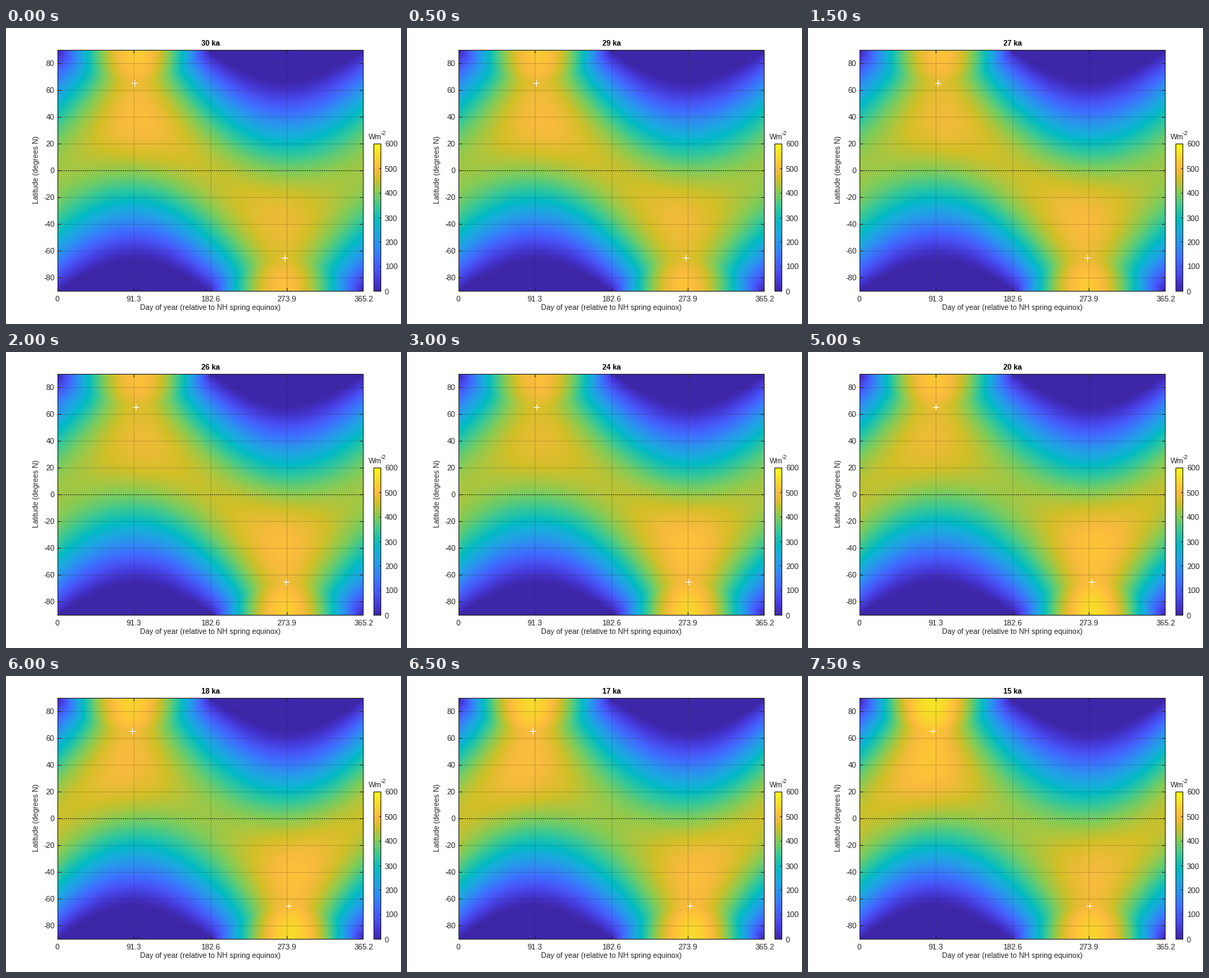
A matplotlib script for the animation above (8000 ms loop, 560 by 420 pixels).

```python
"""Daily insolation by latitude and day of year, 30 ka to 15 ka."""
import numpy as np
import matplotlib.pyplot as plt
from matplotlib.animation import FuncAnimation
from matplotlib.colors import LinearSegmentedColormap

W, H, DPI = 560, 420, 100
PX = 72 / DPI                      # points per pixel
LEFT, RIGHT, TOP, BOTTOM = 73, 507, 31, 374
YEAR = 365.24
SOLAR = 1365
QMAX = 600
START_KA, STEPS = 30, 16
INK = "#262626"

plt.rcParams["font.family"] = "Liberation Sans"

# Blue to yellow; stops are placed in 63rds of the scale
PARULA = LinearSegmentedColormap.from_list("parula", [(s / 63, c) for s, c in (
    (0, (.242, .150, .660)), (4, (.271, .215, .836)), (9, (.281, .323, .958)),
    (14, (.244, .436, .999)), (20, (.169, .570, .936)),
    (26, (.095, .680, .860)), (30, (.007, .731, .766)),
    (36, (.216, .784, .592)), (42, (.504, .799, .348)),
    (48, (.820, .750, .154)), (52, (.973, .730, .239)),
    (54, (.997, .766, .220)), (58, (.968, .864, .164)),
    (63, (.977, .984, .081)))], N=256)


def orbit(ka):
    """Eccentricity, obliquity and solar longitude of perihelion."""
    e = .0204 - .000227 * (ka - 15)
    tilt = 23.25 - 1.01 * np.cos(2 * np.pi * (ka - 29.2) / 40)
    peri = 34.2 - 16.45 * (ka - 15)
    return e, np.radians(tilt), np.radians(peri)


def mean_anomaly(nu, e):
    ea = 2 * np.arctan2(np.sqrt(1 - e) * np.sin(nu / 2),
                        np.sqrt(1 + e) * np.cos(nu / 2))
    return ea - e * np.sin(ea)


def day_at(lon, e, peri):
    """Days from the spring equinox to a solar longitude."""
    m = mean_anomaly(lon - peri, e) - mean_anomaly(-peri, e)
    return m % (2 * np.pi) / (2 * np.pi) * YEAR


def insolation(day, lat, e, tilt, peri):
    m = mean_anomaly(-peri, e) + 2 * np.pi * day / YEAR
    ea = m
    for _ in range(6):
        ea = m + e * np.sin(ea)
    nu = 2 * np.arctan2(np.sqrt(1 + e) * np.sin(ea / 2),
                        np.sqrt(1 - e) * np.cos(ea / 2))
    dec = np.arcsin(np.sin(tilt) * np.sin(nu + peri))
    h = np.arccos(np.clip(-np.tan(lat) * np.tan(dec), -1, 1))
    dist = (1 + e * np.cos(nu)) / (1 - e * e)
    return SOLAR / np.pi * dist ** 2 * (
        h * np.sin(lat) * np.sin(dec) + np.cos(lat) * np.cos(dec) * np.sin(h))


def px(day):
    return LEFT + (RIGHT - LEFT) * day / YEAR


def py(lat):
    return (TOP + BOTTOM) / 2 - (BOTTOM - TOP) * lat / 180


def mid(v):
    """Centre of the pixel that holds v."""
    return np.floor(v) + .5


fig = plt.figure(figsize=(W / DPI, H / DPI), dpi=DPI, facecolor="white")
ax = fig.add_axes([0, 0, 1, 1])
ax.axis("off")


def line(xs, ys, color=INK, **kw):
    return ax.plot(xs, ys, color=color, lw=PX, snap=False,
                   solid_capstyle="butt", dash_capstyle="butt", **kw)[0]


def label(x, y, s, ha="center", size=10.45, **kw):
    kw = {"va": "center_baseline", "color": INK, **kw}
    return ax.text(x, y, s, ha=ha, fontsize=size * PX, **kw)


def tick_label(x, y, s, ha="center"):
    label(x, y, s, ha, 11)


def box(x0, y0, x1, y1):
    ax.add_patch(plt.Rectangle((x0 + .5, y0 + .5), x1 - x0 - 1, y1 - y0 - 1,
                               fill=False, ec=INK, lw=PX, snap=False,
                               zorder=4))


def image(data, x0, y0, x1, y1):
    return ax.imshow(data, cmap=PARULA, vmin=0, vmax=QMAX,
                     extent=(x0, x1, y1, y0), aspect="auto",
                     interpolation="nearest")


days = np.linspace(0, YEAR, RIGHT - LEFT)[None, :]
lats = np.radians(np.linspace(90, -90, BOTTOM - TOP))[:, None]
field = image(0 * days * lats, LEFT, TOP, RIGHT, BOTTOM)

for k in range(5):
    x = px(k * YEAR / 4)
    if 0 < k < 4:
        line([mid(x)] * 2, [TOP, BOTTOM], alpha=.2)
        line([mid(x)] * 2, [TOP, TOP + 5])
        line([mid(x)] * 2, [BOTTOM - 5, BOTTOM])
    tick_label(x, 384.5, f"{k * 91.3:.1f}" if k else "0")

for lat in range(-80, 81, 20):
    y = mid(py(lat))
    line([LEFT, RIGHT], [y, y], alpha=.2)
    line([LEFT, LEFT + 5], [y, y])
    line([RIGHT - 5, RIGHT], [y, y])
    tick_label(69, y, str(lat), "right")

line([LEFT, RIGHT], [mid(py(0))] * 2, "black", ls=(0, (1, 2)))
box(LEFT, TOP, RIGHT, BOTTOM)

BAR = 521, 164, 532, 374
image(np.linspace(QMAX, 0, 210)[:, None], *BAR)
box(*BAR)
for q in range(0, QMAX + 1, 100):
    y = mid(373.5 - 209 * q / QMAX)
    line([529, 532], [y, y])
    tick_label(537, y, str(q), "left")

label(514, 158, "Wm", "left", va="baseline")
label(530.5, 152.5, "-2", "left", 9.2, va="baseline")
label(290, 396.5, "Day of year (relative to NH spring equinox)")
label(43, 201, "Latitude (degrees N)", rotation=90, va="center")
title = label(290, 25.4, "", weight="bold", color="black", va="baseline")

crosses = [(lon, mid(py(lat)), line([], [], "white", zorder=5),
            line([], [], "white", zorder=5))
           for lon, lat in ((np.pi / 2, 65), (3 * np.pi / 2, -65))]

ax.set_xlim(0, W)
ax.set_ylim(H, 0)


def draw(i):
    ka = START_KA - i
    e, tilt, peri = orbit(ka)
    field.set_data(insolation(days, lats, e, tilt, peri))
    for lon, y, across, down in crosses:
        x = mid(px(day_at(lon, e, peri)))
        across.set_data([x - 4.5, x + 4.5], [y, y])
        down.set_data([x, x], [y - 4.5, y + 4.5])
    title.set_text(f"{ka} ka")
    return [field, title]


anim = FuncAnimation(fig, draw, frames=STEPS, interval=500, repeat=True,
                     repeat_delay=0, blit=False)
plt.show()
```
